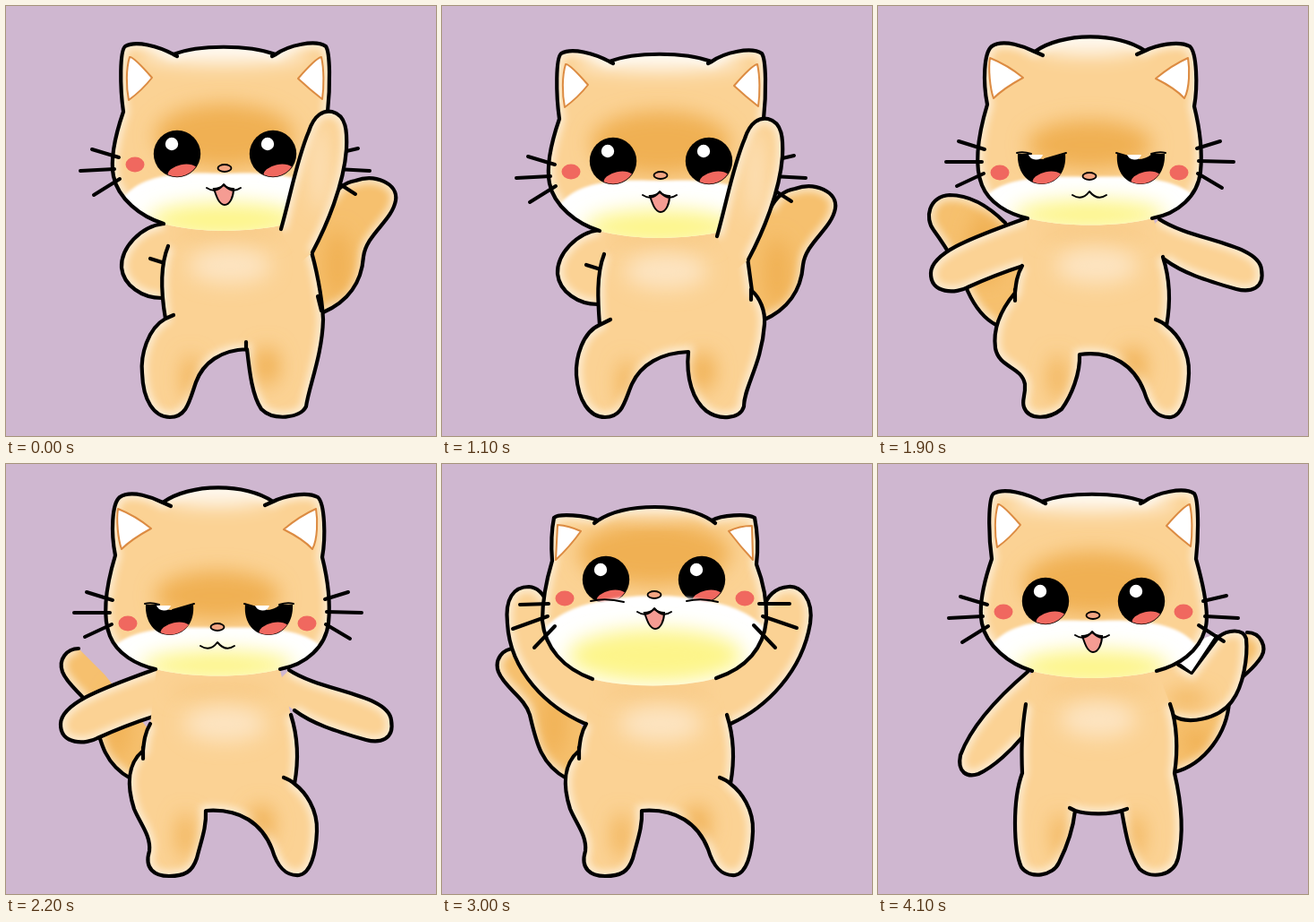
An HTML page that plays this animation: 480 by 480 pixels, repeating every 4.2 s.

```html
<!DOCTYPE html>
<html lang="en">
<head>
<meta charset="utf-8">
<title>Dancing kitten</title>
<style>
  html, body { margin: 0; width: 100%; height: 100%; overflow: hidden; background: #cfb7d0; }
  svg { display: block; width: 100vw; height: 100vh; }
  .pose { display: none; }
  .pose.on { display: inline; }
  .ink { fill: none; stroke: #000; stroke-width: 4.2; stroke-linecap: round; stroke-linejoin: round; }
  .rim { fill: none; stroke: #fff; stroke-width: 12; opacity: .6; filter: url(#glow); }
  .thin { stroke-width: 2; }
  .whisker { stroke-width: 4; }
  .ear { fill: #fff; stroke: #dc8b42; stroke-width: 2; stroke-linejoin: round; }
  .red { fill: #f0685f; }
</style>
</head>
<body>
<svg id="stage" viewBox="0 0 480 480" xmlns="http://www.w3.org/2000/svg">
  <defs>
    <filter id="soft" x="-200%" y="-200%" width="500%" height="500%"><feGaussianBlur stdDeviation="11"/></filter>
    <filter id="glow" x="-20%" y="-20%" width="140%" height="140%"><feGaussianBlur stdDeviation="4"/></filter>
    <filter id="edge"><feGaussianBlur stdDeviation="1.5"/></filter>
    <clipPath id="iris"><circle r="25.5"/></clipPath>
  </defs>
</svg>
<script>
const BASE = '#fbd294', DARK = '#f0b053', NECK = '#f6c47c', PALE = '#fde4c1', WHITE = '#fff', YELLOW = '#fdf58a';
let clips = 0;

const ink = (d, cls = '') => `<path class="ink ${cls}" d="${d}"/>`;
const blob = (x, y, rx, ry, color) =>
  `<ellipse cx="${x}" cy="${y}" rx="${rx}" ry="${ry}" fill="${color}" filter="url(#soft)"/>`;
const put = (transform, art) => `<g transform="${transform}">${art}</g>`;
const shift = (x, y, art) => put(`translate(${x} ${y})`, art);

// A closed fill with a light rim and soft shading inside, and an open outline on top.
function part(line, close, inner = '', extra = '', base = BASE) {
  const id = 'c' + clips++;
  const d = line + close + 'Z';
  return `<clipPath id="${id}"><path d="${d}"/></clipPath><path d="${d}" fill="${base}"/>
    <g clip-path="url(#${id})"><path class="rim" d="${line}"/>${inner}</g>${ink(line + extra)}`;
}

const muzzle = d => `<path d="${d}" fill="#fff" filter="url(#edge)"/>`;
const ears = (...list) => list.map(d => `<path class="ear" d="${d}Z"/>`).join('');
const blush = (x, y) => `<ellipse class="red" cx="${x}" cy="${y}" rx="10.5" ry="8.5"/>`;
const iris = (x, y) =>
  `<g clip-path="url(#iris)"><ellipse class="red" cx="${x}" cy="${y}" rx="17" ry="9" transform="rotate(-12 ${x} ${y})"/></g>`;
const eye = (x, y) => shift(x, y, `<circle r="26.2"/>
  <circle cx="-6" cy="-11" r="7.2" fill="#fff"/>${iris(6, 21)}`);
const nose = (x, y) =>
  `<ellipse cx="${x}" cy="${y}" rx="7.5" ry="4" fill="#f3a583" stroke="#000" stroke-width="1.8"/>`;
const lips = (x, y) => ink(`M${x - 19},${y + 5} q11,7 19,-4 q9,11 19,4`, 'thin');
const tongue = (x, y) =>
  `<path d="M${x - 11},${y + 6} c3,9 6,18 12,18 c6,0 10,-9 10,-18 q-6,0 -11,-4 q-5,4 -11,4Z" fill="#f59c93" stroke="#000" stroke-width="2"/>`;

// Heads
function happyHead() {
  const head = part(
    'M315,243 C339,237 362,222 369,197 C374,182 368,150 359,118 C362,90 362,52 357,45 C345,37 315,44 301,54 C270,43 215,43 187,54 C170,45 145,38 133,45 C127,50 127,90 131,118 C120,150 117,175 120,190 C125,215 150,235 176,243',
    'C215,254 275,253 315,243',
    blob(244, 145, 78, 36, DARK) + blob(244, 52, 92, 11, WHITE) +
    muzzle('M131,214 C148,192 180,184 243,187 C306,184 342,192 359,214 C350,230 330,240 315,246 C275,256 215,256 176,246 C155,238 140,228 131,214Z') +
    blob(244, 239, 85, 20, YELLOW),
    'M187,54 l4,2 M301,54 l-4,2');
  return head +
    ears('M138,57 Q142,56 163,80 Q152,94 137,105 C134,90 134,70 138,57',
         'M352,57 Q346,58 326,81 Q340,94 353,104 C355,90 355,70 352,57') +
    blush(144, 177) + blush(345, 177) + eye(191, 165) + eye(298, 165) + nose(244, 181) +
    tongue(243, 198) + lips(243, 198) +
    ink('M96,160 L126,169 M83,184 L121,182 M98,211 L127,193 M367,165 L393,159 M369,182 L406,184 M362,192 L390,210', 'whisker');
}

function grumpyHead() {
  const glare = (x, flip) => shift(x, 173, put(`scale(${flip} 1)`,
    `<path d="M-27,-8 L-13,-8 Q-6,-2 3,-2 L26,-8 C28,12 16,26 0,26 C-18,26 -28,10 -27,-8Z"/>
     ${ink('M-28,-9 Q-21,-11 -12,-8 M3,-2 L27,-9', 'thin')}`) +
    `<path d="M-15,-7 h16 q-2,6 -8,5.500 q-6,-.5 -8,-5.500Z" fill="#fff"/>${iris(6, 21)}`);
  const head = part(
    'M306,237 C335,232 357,212 360,185 C362,165 360,140 353,112 C357,90 356,52 348,45 C335,38 310,44 298,50 C268,29 205,29 175,51 C165,46 140,36 127,45 C118,52 117,85 122,110 C110,150 108,180 116,200 C124,220 145,232 167,237',
    'C205,247 270,247 306,237',
    blob(236, 155, 70, 28, DARK) + blob(236, 42, 62, 11, WHITE) +
    muzzle('M122,211 C140,194 175,189 236,191 C297,189 332,194 351,211 C342,226 325,236 306,240 C270,250 205,250 167,240 C148,236 132,226 122,211Z') +
    blob(236, 233, 85, 17, YELLOW),
    'M175,51 l9,4 M298,50 l-9,4');
  return head +
    ears('M125,58 Q145,66 162,80 Q140,92 129,103 C125,92 123,70 125,58',
         'M346,58 Q328,66 310,81 Q332,92 342,103 C348,92 348,70 346,58') +
    blush(136, 186) + blush(336, 186) + glare(183, 1) + glare(293, -1) + nose(236, 190) + lips(236, 206) +
    ink('M90,151 L119,160 M76,174 L116,174 M88,201 L118,187 M356,159 L382,151 M358,173 L397,174 M357,187 L384,203', 'whisker');
}

function cheerHead() {
  const inner = blob(237, 100, 85, 36, DARK) + blob(237, 50, 45, 5, WHITE) + eye(183, 129) + eye(290, 129) +
    muzzle('M112,190 C124,160 185,147 237,147 C290,147 350,160 363,190 C357,215 338,232 306,243 C270,252 205,252 168,243 C135,232 118,212 112,190Z') +
    blob(238, 214, 98, 30, YELLOW);
  const head = part(
    'M306,239 C340,228 359,205 362,175 C363,150 358,130 351,112 C353,95 352,75 349,60 C340,55 312,57 301,63 C270,43 205,43 174,63 C160,57 130,55 125,60 C122,75 122,95 123,108 C117,128 112,150 112,175 C115,205 135,228 168,240',
    'C205,250 270,250 306,239', inner, 'M174,63 l-4,3 M301,63 l4,3');
  return head +
    ears('M129,68 Q142,69 155,75 Q143,92 127,107', 'M346,69 Q332,69 320,75 Q333,92 347,107') +
    blush(137, 150) + blush(338, 150) +
    ink('M166,153 Q183,149 203,154 M273,153 Q290,149 308,154', 'thin') +
    nose(237, 146) + tongue(237, 160) + lips(237, 160) +
    ink('M87,157 L119,156 M79,184 L118,170 M103,205 L126,181 M354,156 L388,156 M358,170 L396,183 M348,180 L372,205', 'whisker');
}

// Bodies
const bodyShade = x => blob(x, 254, 60, 6, NECK) + blob(x + 4, 290, 46, 20, PALE) +
  blob(x + 45, 402, 14, 22, DARK) + blob(x - 40, 415, 9, 26, DARK);

const waveBody = () => part(
  'M181,268 C172,290 173,320 178,349 C158,360 150,390 152,410 C153,440 165,459 183,459 C202,459 205,440 212,420 C220,398 240,384 269,383 C272,410 275,435 285,450 C298,463 328,461 335,447 C338,425 353,390 354,350 C353,325 346,290 339,268',
  'L322,235 L185,235',
  bodyShade(246),
  'M187,345 L178,349 M268,375 V384 M348,324 L352,340');

const waveBodyLow = () => part(
  'M181,277 C172,300 174,330 176,356 C157,364 149,392 150,412 C152,440 164,459 182,459 C202,459 204,440 212,422 C222,400 245,387 275,386 C272,415 280,440 295,452 C310,463 333,461 337,447 C337,425 357,400 360,355 C361,340 355,326 346,318 L341,281',
  'L322,245 L185,245',
  shift(0, 6, bodyShade(246)),
  'M188,350 L176,356 M345,316 V328');

// The two hips share everything but the left leg.
const sideBody = leg => part(
  `M161,290 C155,300 154,310 153,320 ${leg} C262,384 286,402 297,430 C303,450 312,460 327,459 C340,457 346,435 347,410 C348,385 334,366 322,357 C327,330 326,305 318,280`,
  'L306,230 L168,230',
  bodyShade(240),
  'M153,316 V329 M310,350 Q318,353 322,357');
const highBody = () => sideBody('C135,335 135,360 143,385 C150,402 162,415 160,432 C154,452 166,460 182,460 C200,460 208,455 213,440 C218,420 224,405 223,387');
const lowBody = () => sideBody('C138,338 128,360 131,382 C135,404 160,402 164,422 C165,435 160,440 163,448 C168,462 190,462 205,450 C216,435 226,410 225,389');

const standBody = () => part(
  'M165,268 C160,300 160,320 161,345 C150,375 151,430 160,450 C170,464 195,460 202,445 C212,425 218,405 220,387 C235,392 260,391 272,387 C276,410 280,435 292,452 C305,464 330,460 335,440 C342,410 338,375 331,345 C335,320 334,290 326,268',
  'L311,228 L172,228',
  blob(246, 250, 60, 6, NECK) + blob(246, 285, 42, 20, PALE) + blob(203, 415, 8, 25, DARK) + blob(288, 415, 8, 25, DARK),
  'M214,384 L220,387 M278,385 L272,387');

// Arms and tails
const hipArm = () => part('M176,243 C150,246 128,270 129,292 C131,312 152,326 174,326', 'L195,300 L195,240',
  '', 'M161,282 L177,287');

const highArm = () => part(
  'M307,249 C318,210 325,170 338,140 C344,121 355,116 364,118 C380,122 381,140 380,160 C377,200 358,245 342,275',
  'L330,285 L312,262', blob(350, 180, 8, 50, PALE));

const rightTail = () => part(
  'M362,218 C370,202 379,197 390,195 C412,187 438,198 435,217 C431,240 402,255 399,280 C397,308 382,330 354,342',
  'L320,310 L330,230', blob(370, 290, 15, 40, DARK), '', '#f6c06e');

const highTail = () => part(
  'M81,206 C68,206 58,218 63,232 C70,250 92,260 98,280 C105,310 110,335 139,351', 'L162,300 L110,235',
  blob(125, 290, 12, 40, DARK), '', '#f6c06e');

const lowTail = () => part(
  'M142,242 C125,225 105,211 80,211 C56,213 52,237 62,250 C75,268 90,290 100,318 C110,340 120,350 132,356', 'L165,310 L165,240',
  blob(120, 270, 20, 40, DARK), '', '#f6c06e');

const openArms = () => part(
  'M167,236 C120,254 60,272 59,298 C58,322 88,321 100,314 C122,304 140,297 165,289', 'L190,262') + part(
  'M314,238 C350,262 425,265 428,294 C432,316 415,320 400,316 C365,306 340,298 320,283', 'L290,262');

const cheerArms = () => part(
  'M160,290 C118,272 76,232 73,178 C70,150 80,137 97,137 C108,138 114,147 117,155', 'L135,200 L180,240') + part(
  'M322,290 C362,272 402,232 411,178 C415,150 400,136 387,137 C372,138 362,148 360,160', 'L340,200 L295,240');

const byeArms = () => part(
  'M412,188 C428,188 434,205 428,215 C420,228 412,232 405,240 C398,250 393,256 392,265 C390,300 365,335 331,344', 'L325,280 L395,220',
  blob(355, 310, 15, 15, DARK), '', '#f6c06e') + part(
  'M167,232 C140,255 105,290 92,325 C88,345 100,350 112,346 C130,338 150,318 160,306', 'L185,245') + part(
  'M328,280 C345,292 380,285 395,265 C408,248 413,215 411,195 C408,183 390,185 380,193 L350,233 L335,224', 'L300,228 L300,275',
  blob(345, 262, 25, 8, DARK)) +
  `<path d="M338,223 L365,194 L379,189 L350,233Z" fill="#fff"/>${ink('M338,224 L350,233 L378,191', 'thin')}`;

// Each dance move bobs between a high and a low pose, 8 units apart.
const poses = {
  wave: rightTail() + hipArm() + waveBody() + happyHead() + highArm(),
  waveLow: shift(4, 9, rightTail()) + shift(0, 7, hipArm()) + waveBodyLow() + shift(0, 8, happyHead() + highArm()),
  grumpy: highTail() + shift(2, -8, openArms()) + highBody() + shift(0, -8, grumpyHead()),
  grumpyLow: lowTail() + openArms() + lowBody() + grumpyHead(),
  cheer: highTail() + cheerArms() + highBody() + cheerHead(),
  cheerLow: lowTail() + shift(0, 8, cheerArms()) + lowBody() + shift(0, 8, cheerHead()),
  bye: byeArms() + standBody() + shift(-4, -12, happyHead())
};

const stage = document.getElementById('stage');
stage.insertAdjacentHTML('beforeend', Object.entries(poses)
  .map(([name, art]) => `<g class="pose" id="${name}">${art}</g>`).join(''));

const STEP = 100, LOOP = 4200;

function poseAt(step) {
  if (step === 41) return 'bye';
  const move = step < 18 ? 'wave' : step < 24 ? 'grumpy' : 'cheer';
  return move + (step % 2 ? 'Low' : '');
}

let shown, start;
function draw(now) {
  start ??= now;
  const name = poseAt(Math.floor((now - start) % LOOP / STEP));
  if (name !== shown) {
    if (shown) document.getElementById(shown).classList.remove('on');
    document.getElementById(name).classList.add('on');
    shown = name;
  }
  requestAnimationFrame(draw);
}
draw(performance.now());
</script>
</body>
</html>
```
